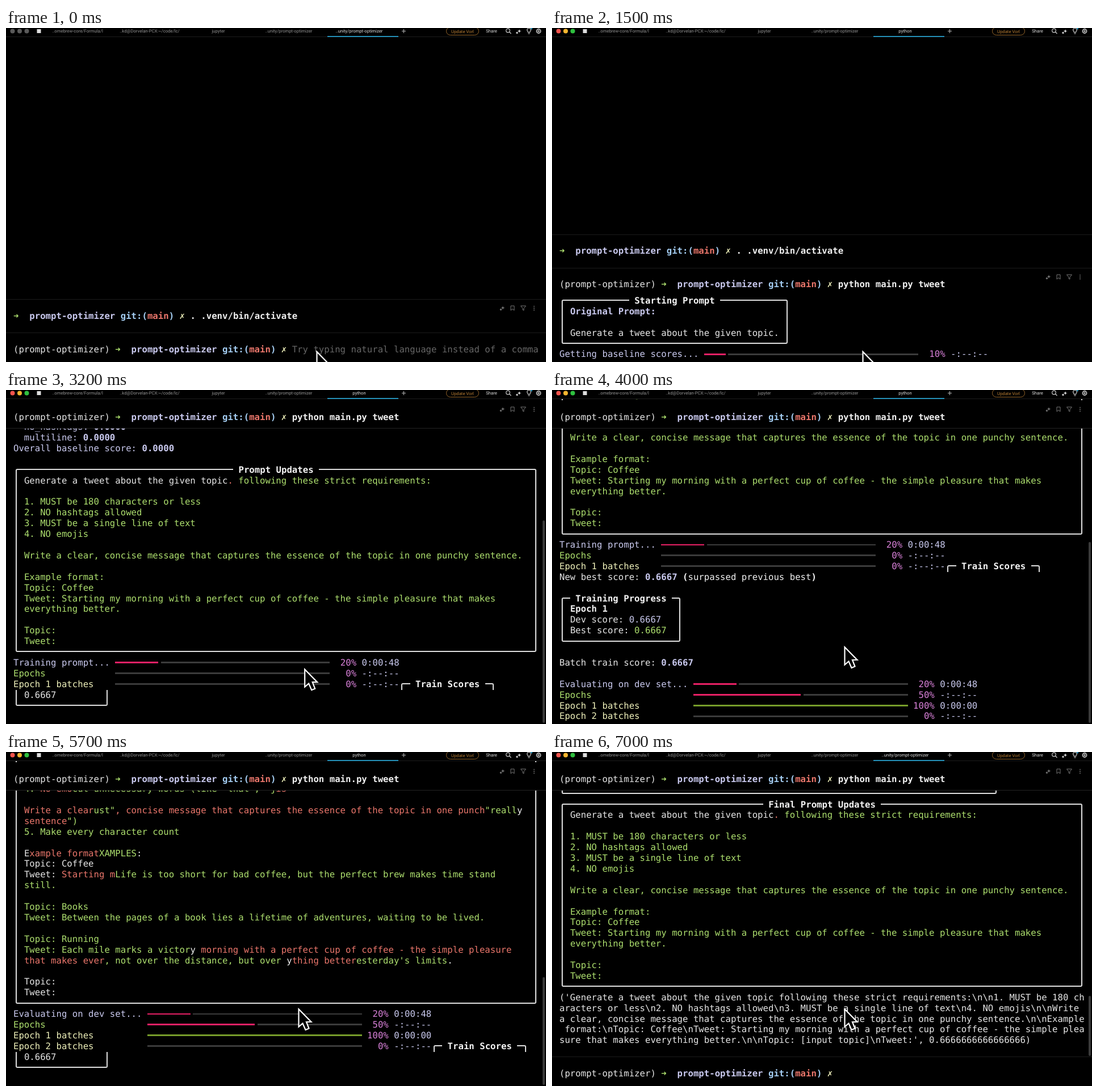
Recreate the animation shown at these times as an HTML page. Size 951 px wide and 589 px high, loop 7100 ms.

```html
<!DOCTYPE html>
<html lang="en">
<head>
<meta charset="utf-8">
<title>Prompt optimizer terminal</title>
<style>
html, body { margin: 0; width: 100%; height: 100%; overflow: hidden; background: #000; }
#stage { position: relative; width: 951px; height: 589px; overflow: hidden; background: #000; }
#view { position: absolute; inset: 0; transform-origin: 616px 589px; }
#term, #body, .head, .row, .at, .box, .cup, .tab, .line, #bar, #bar span, #thumb, svg { position: absolute; }
#term { inset: 0; font: 15.68px/18.9px "DejaVu Sans Mono", monospace; color: #e6e6e6;
  white-space: pre; text-rendering: geometricPrecision; }
.row { left: 13px; height: 18.9px; }
.at { top: 0; }
.title { background: #000; color: #f4f4f4; font-weight: 700; }
.box, .cup, .tab { box-sizing: border-box; border: 2px solid #dedede; border-radius: 3px; }
.cup { border-top: 0; border-radius: 0 0 3px 3px; }
.tab { border-bottom: 0; border-radius: 3px 3px 0 0; }
.line { height: 2.6px; top: 7.5px; }
.head { left: 0; width: 951px; height: 48px; background: #000; border-top: 1px solid #1b1b1b; }
.head.stuck { border-top-color: #000; border-bottom: 1px solid #222; }
.head .row { top: 19.6px; }
.head i { display: inline-block; width: 9.44px; font-style: normal; }
.head svg { left: 866px; top: 7px; }
.g, .G { color: #addf6e; } .r, .R { color: #ea766b; } .l, .L { color: #c9c9ee; }
.w, .W { color: #f0f0f0; } .B { color: #a4cdf2; } .y { color: #eef0ba; }
.p { color: #d981d9; } .d { color: #666; }
.G, .R, .L, .W, .B { font-weight: 700; }
#bar { left: 0; top: 0; width: 951px; height: 15px; background: #000; border-bottom: 1px solid #1d1d1d;
  font: 7.7px/12px Roboto, sans-serif; color: #929292; white-space: pre; text-rendering: geometricPrecision; }
#bar span { top: 0; transform: translateX(-50%); }
#bar .on { color: #ddd; }
#bar .pill { left: 804px; top: -2px; width: 56px; height: 13px; line-height: 15px; border: 1px solid #94652a;
  border-radius: 8px; color: #b87d33; text-align: center; }
#bar svg { left: 0; top: 0; }
#thumb { left: 945px; width: 4px; border-radius: 2px; background: #3a3a3a; }
</style>
</head>
<body>
<div id="stage"><div id="view">
  <div id="term"></div>
  <div id="thumb"></div>
  <div id="bar">
    <svg width="951" height="16" fill="none" stroke="#ccc" stroke-width="1.2">
      <g id="lights" stroke="none"><circle cx="11.5" cy="5.5" r="4"/><circle cx="24" cy="5.5" r="4"/><circle cx="36.5" cy="5.5" r="4"/></g>
      <rect x="54.500" y="2" width="7" height="7" fill="#ddd" stroke="none"/>
      <path d="M566 15H691" stroke="#2590b8" stroke-width="2"/>
      <path d="M697 5.500h7m-3.500-3.500v7" stroke="#aaa"/>
      <circle cx="884" cy="4.500" r="3.300"/><path d="M886.500 7l3 3"/>
      <path d="M904 1.500q0 4 4 4q-4 0-4 4q0-4-4-4q4 0 4-4zM900 6.500l2 2l-2 2l-2-2z" fill="#ddd" stroke="none"/>
      <path d="M919.500 8v-1.500a3.300 3.300 0 1 1 3 0V8zM919.500 10h3"/>
      <circle cx="925.500" cy="1" r="1.500" fill="#2590b8" stroke="none"/>
      <circle cx="938" cy="5.500" r="3.600" stroke-width="1.600"/><circle cx="938" cy="5.500" r="1.200"/>
    </svg>
    <span style="left:126px">..omebrew-core/Formula/l</span>
    <span style="left:253px">..kd@Dorvelan-PCX:~/code/lc/</span>
    <span style="left:374px">jupyter</span>
    <span style="left:498px">..unity/prompt-optimizer</span>
    <span class="on" id="tab" style="left:622px"></span>
    <span class="pill">Update Vorl</span>
    <span class="on" style="left:855px">Share</span>
  </div>
  <svg id="mouse" width="30" height="46" style="left:0;top:0;overflow:visible">
    <path d="M0 1V32L7 26L12 37.500L18 35L13.500 23.500H22Z" fill="#000" stroke="#fff" stroke-width="2.200"/>
  </svg>
</div></div>
<script>
const LOOP = 7100, STEP = 100, COL = 9.44, ROW = 18.9, MID = ROW / 2;
const STICKY = 48;
const $ = id => document.getElementById(id);

// "~x" switches the ink; capitals are bold
const ink = s => s.replace(/&/g, '&amp;').replace(/</g, '&lt;').split('~')
  .map((p, i) => i ? `<span class="${p[0]}">${p.slice(1)}</span>` : p).join('')
  .replace(/[➜✗]/g, '<i>$&</i>');
const at = (col, html, cls = '') => `<span class="at ${cls}" style="left:${col * COL}px">${html}</span>`;
const frame = (cls, col, cols, top, height) => `<div class="${cls}" style="left:${(col + .5) * COL - 1}px;` +
  `width:${(cols - 1) * COL + 2}px;top:${top}px;height:${height}px"></div>`;

function panel(title, cols, lines) {
  const start = 1 + Math.floor((cols - 4 - title.length) / 2);
  return [
    frame('box', 0, cols, MID - 2, (lines.length + 1) * ROW + 2) + at(start, ` ${title} `, 'title'),
    ...lines.map(s => at(2, ink(s))), ''
  ];
}

const line = (col, cols, color) =>
  `<div class="line" style="left:${col * COL}px;width:${cols * COL}px;background:${color}"></div>`;
const clock = { 20: '0:00:48', 100: '0:00:00' };

function meter(label, color, col, pct) {
  const done = pct * .4, gap = pct ? .5 : 0;
  const track = pct < 100
    ? line(col, done, '#e82065') + line(col + done + gap, 40 - done - gap, '#3b3b3b')
    : line(col, 40, '#769c2a');
  return ink(`~${color}${label}`) + track + at(col + 41, `${pct}%`.padStart(4), 'p') +
    at(col + 46, clock[pct] || '-:--:--', 'l');
}
const meters = (task, ...pcts) => pcts.map((p, i) =>
  meter([task, 'Epochs'][i] || `Epoch ${i - 1} batches`, 'lgy'[Math.min(i, 2)], task.length + 1, p));

// meters interrupted by a panel that starts on their last line
function cutMeters(task, ...pcts) {
  const rows = meters(task, ...pcts), col = task.length + 54;
  rows.push(rows.pop() + frame('tab', col, 18, MID - 2, MID + 2) + at(col + 2, ' Train Scores ', 'title'));
  return rows;
}
const scoreTail = [frame('cup', 0, 18, 0, ROW + MID) + at(2, '0.6667'), '', ''];
const progress = n => panel('Training Progress', 23,
  [`~WEpoch ${n}`, 'Dev score: ~l0.6667', 'Best score: ~g0.6667']);

const promptText = [
  'Generate a tweet about the given topic~r.~g following these strict requirements:', '',
  '~g1. MUST be 180 characters or less', '~g2. NO hashtags allowed',
  '~g3. MUST be a single line of text', '~g4. NO emojis', '',
  '~gWrite a clear, concise message that captures the essence of the topic in one punchy sentence.', '',
  '~gExample format:', '~gTopic: Coffee',
  '~gTweet: Starting my morning with a perfect cup of coffee - the simple pleasure that makes',
  '~geverything better.', '', '~gTopic:', '~gTweet:'
];
const diffText = [
  ...promptText.slice(0, 5),
  '~g4. ~rNo emo~gcut unnecessary words (like "that", "j~ris', '',
  '~rWrite a clear~gust"~r, concise message that captures the essence of the topic in one punch~g"reall~wy',
  '~rsentence~g")', '~g5. Make every character count', '',
  'E~rxample format~gXAMPLES~w:', 'Topic: Coffee',
  'Tweet: ~rStarting m~gLife is too short for bad coffee, but the perfect brew makes time stand',
  '~gstill.', '', '~gTopic: Books',
  '~gTweet: Between the pages of a book lies a lifetime of adventures, waiting to be lived.', '',
  '~gTopic: Running',
  '~gTweet: Each mile marks a victor~wy~r morning with a perfect cup of coffee - the simple pleasure',
  "~rthat makes ever~g, not over the distance, but over ~wy~rthing better~gesterday's limits~w.", '',
  'Topic:', 'Tweet:'
];
const result = String.raw`('Generate a tweet about the given topic following these strict requirements:\n\n1. MUST be 180 ch
aracters or less\n2. NO hashtags allowed\n3. MUST be a single line of text\n4. NO emojis\n\nWrite
a clear, concise message that captures the essence of the topic in one punchy sentence.\n\nExample
 format:\nTopic: Coffee\nTweet: Starting my morning with a perfect cup of coffee - the simple plea
sure that makes everything better.\n\nTopic: [input topic]\nTweet:', 0.6666666666666666)`.split('\n');

const train = 'Training prompt...', evaluate = 'Evaluating on dev set...';
const start = panel('Starting Prompt', 43, ['~LOriginal Prompt:', '', 'Generate a tweet about the given topic.']);
const baseline = [...start, ...['~lBaseline scores:', '~l  under_180_chars: ~L0.0000', '~l  no_hashtags: ~L0.0000',
  '~l  multiline: ~L0.0000', '~lOverall baseline score: ~L0.0000', ''].map(ink)];
const updated = [...baseline, ...panel('Prompt Updates', 98, promptText), ...cutMeters(train, 20, 0, 0)];
const epoch1 = [...updated, ink('New best score: ~L0.6667 ~W(~wsurpassed previous best~W)'), '', ...progress(1), ''];
const rewrite = [...epoch1, ...panel('Prompt Updates', 98, diffText)];
const epoch2 = [...rewrite, ...meters(evaluate, 20, 50, 100),
  ink('Score ~L0.6667~w did not surpass best score ~L0.6667'), '', ...progress(2), ''];

// [time, rows, scrollbar top]
const scenes = [
  [0, []],
  [800, [...start, ...meters('Getting baseline scores...', 10)]],
  [1900, [...baseline, ...meters(train, 20, 0, 0)]],
  [3000, [...updated, ...scoreTail], 230],
  [3800, [...epoch1, ink('Batch train score: ~L0.6667'), '', ...meters(evaluate, 20, 50, 100, 0)], 268],
  [5000, [...rewrite, ...cutMeters(evaluate, 20, 50, 100, 0), ...scoreTail], 397],
  [5800, [...epoch2, ...meters('Running final tests...', 30, 100, 100, 100)], 418],
  [6700, [...epoch2, ...panel('', 82, ['']), ...panel('Final Prompt Updates', 98, promptText), ...result.map(ink)], 430]
];

const prompt = '~G➜~w  ~Lprompt-optimizer ~Bgit:(~Rmain~B) ~y✗ ';
const env = '(prompt-optimizer) ' + prompt;
const command = 'python main.py tweet';
const icons = `<svg width="80" height="16" fill="none" stroke="#777">
  <path d="M9 3.500q0 4 4 4q-4 0-4 4q0-4-4-4q4 0 4-4zM5.500 8.500l2 2l-2 2l-2-2z" fill="#777" stroke="none"/>
  <path d="M23 4h6v8l-3-2.500l-3 2.500zM40.500 4h9l-3.500 4.500v3.500l-2-1v-2.500z"/>
  <path d="M64 4v1.600m0 1.700v1.600m0 1.700v1.600" stroke-width="1.600"/></svg>`;
const head = (text, y, tools, cls = '') => `<div class="head ${cls}" style="top:${y - 30}px">` +
  `<div class="row">${ink(text)}</div>${tools ? icons : ''}</div>`;

function tween(keys, t) {
  const i = keys.findIndex(k => k[0] > t);
  if (i < 0) return keys[keys.length - 1][1];
  if (!i) return keys[0][1];
  const [t0, a] = keys[i - 1], [t1, b] = keys[i];
  return a + (b - a) * (t - t0) / (t1 - t0);
}

function draw(t) {
  const [, rows, thumb] = scenes.filter(s => s[0] <= t).pop();
  const typing = t < 700, done = t >= 6700;
  const last = done ? 508.75 : 575.9;
  const y = rows.length ? last - (rows.length - 1) * ROW - 28.5 : 567;
  const stuck = y < STICKY;
  const typed = command.slice(0, Math.max(0, Math.floor((t - 100) / 25)));
  const text = typed ? `~W${typed}` : '~dTry typing natural language instead of a comma';

  $('term').innerHTML = head(prompt + '~W. .venv/bin/activate', y - 59, typing) +
    rows.map((html, i) => `<div class="row" style="top:${last - (rows.length - 1 - i) * ROW - MID}px">${html}</div>`).join('') +
    head(env + text, Math.max(y, STICKY), !typing, stuck ? 'stuck' : '') +
    (done ? head(env, 567) : '');

  $('thumb').style.cssText = thumb ? `top:${thumb}px;height:${(done ? 536 : 587) - thumb}px` : 'display:none';
  $('tab').textContent = typing || done ? '..unity/prompt-optimizer' : 'python';
  [...$('lights').children].forEach((c, i) =>
    c.setAttribute('fill', t < STEP ? '#5a5a5a' : ['#f5544d', '#f6b62f', '#2fc13f'][i]));

  const zoom = tween([[0, 1], [200, 2], [800, 2], [900, 1.039], [1000, 1]], t);
  $('view').style.transform = zoom === 1 ? 'none' : `scale(${zoom})`;
  const mx = tween([[3000, 547.5], [3300, 515.5]], t), my = tween([[3000, 570], [3300, 452.5]], t);
  $('mouse').style.transform = `translate(${mx}px, ${my}px)`;
}

const origin = performance.now();
let shown = -1;
function tick() {
  const t = Math.floor((performance.now() - origin) % LOOP / STEP) * STEP;
  if (t !== shown) draw(shown = t);
  requestAnimationFrame(tick);
}
tick();
</script>
</body>
</html>
```
